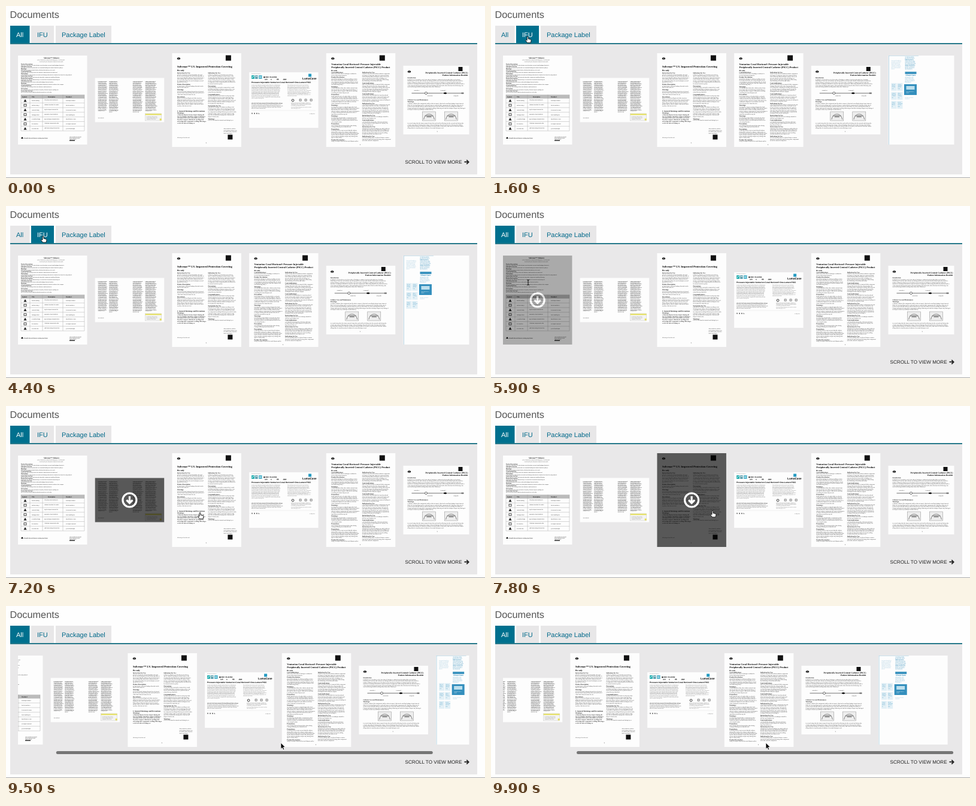
Recreate the animation shown at these times as an HTML page. Size 800 px wide and 288 px high, loop 10000 ms.

```html
<!DOCTYPE html>
<html lang="en">
<head>
<meta charset="utf-8">
<title>Documents</title>
<style>
html, body { margin: 0; width: 100%; height: 100%; overflow: hidden; background: #fefefe; }
svg { display: block; font-family: "Liberation Sans", Arial, sans-serif; text-rendering: geometricPrecision; }
.serif { font-family: "Liberation Serif", "Times New Roman", serif; }
.bold { font-weight: bold; }
.tip { font-family: Inter, "Liberation Sans", sans-serif; }
text { white-space: pre; }
</style>
</head>
<body>
<svg id="stage" width="800" height="288" viewBox="0 0 800 288"></svg>
<script>
const TEAL = '#00708e', W = 115.5, PITCH = 128.7, LOOP = 10000, STEP = 100;
const HEIGHTS = [149, 74, 157, 93, 157, 115, 149];

let seed = 7;
const rnd = () => (seed = seed * 16807 % 2147483647) / 2147483647;

const text = (x, y, s, size, cls = '', more = '') =>
  `<text x="${x}" y="${y}" font-size="${size}" class="${cls}" ${more}>${s}</text>`;
const rect = (x, y, w, h, fill, more = '') =>
  `<rect x="${x}" y="${y}" width="${w}" height="${h}" fill="${fill}" ${more}/>`;
const path = (d, more = '') => `<path d="${d}" ${more}/>`;
const range = (n, f) => Array.from({ length: n }, (_, i) => f(i)).join('');

// Running filler text
const WORDS = ('the catheter should be placed using sterile technique and secured to the skin as directed ' +
  'by a trained clinician do not alter any component during insertion or removal inspect site daily for ' +
  'redness swelling or leakage dispose of used items following local policy').split(' ');
const STREAM = Array.from({ length: 500 }, () => WORDS[rnd() * WORDS.length | 0]).join(' ');
const HEADS = ['Product Description:', 'Indications for Use:', 'Warnings:', 'Contraindications:', 'Precautions:', 'Instructions for Use:'];

function para(x, y, w, n, size, lead, cls = 'serif', fill = '#222') {
  const chars = Math.round(w / size / (cls.includes('serif') ? .425 : .5));
  return range(n, i => {
    const from = rnd() * (STREAM.length - 200) | 0;
    const len = i == n - 1 && n > 1 ? chars * (.4 + rnd() * .4) : chars;
    return text(x, y + i * lead, STREAM.substr(from, len).trim(), size, cls, `fill="${fill}"`);
  });
}

// Headed paragraphs filling a column
function column(x, y, w, bottom, size = 2.3, lead = 2.55) {
  let out = '';
  while (y < bottom) {
    const n = Math.max(1, Math.min(2 + rnd() * 6 | 0, Math.floor((bottom - y) / lead)));
    out += text(x, y, HEADS[rnd() * HEADS.length | 0], size + .2, 'serif bold') + para(x, y + lead, w, n, size, lead);
    y += (n + 1.5) * lead;
  }
  return out;
}

const badge = (x, y) => `<ellipse cx="${x}" cy="${y}" rx="2.8" ry="1.8"/>` +
  text(x - 1.4, y + .8, 'EN', 2, 'bold', 'fill="#fff"');

const pages = [
  () => text(43, 5.2, 'Solvenar™ Velmora', 3, 'serif bold') +
    para(32, 8, 52, 1, 2, 2) + para(36, 10.5, 44, 1, 2, 2) +
    range(12, i => text(5, 14.5 + i * 4.1, HEADS[i % 6], 2, 'bold') +
      para(5, 16.5 + i * 4.1, 55 + rnd() * 50, 1, 1.9, 2, '')) +
    rect(5, 65.5, 106, 6, '#bbb') +
    range(4, i => text([7, 23, 50, 80][i], 69.5, ['Symbol', 'Title', 'Description', 'Standard'][i], 2.2, 'bold')) +
    range(8, i => path(`M5 ${71.5 + i * 7.8}H111`, 'stroke="#999" stroke-width=".4"')) +
    range(5, i => path(`M${[5, 20, 41, 75, 111][i]} 65.5V126`, 'stroke="#999" stroke-width=".4"')) +
    range(7, i => {
      const y = 75.4 + i * 7.8;
      return (i % 2 ? rect(10, y - 1.7, 4, 3.4, 'none', 'stroke="#222" stroke-width=".8"')
                    : path(`M9.5 ${y + 2}L12 ${y - 2.5}L14.5 ${y + 2}Z`, 'fill="#222"')) +
        para(23, y + .7, 15, 1, 2, 2, '') + para(44, y, 28, 1, 2, 2, '') + para(80, y + .7, 18, 1, 2, 2, '');
    }) +
    path('M5 139l2-3l2 3z') + para(10, 139, 42, 1, 2.1, 2, 'bold') +
    para(86, 137, 21, 3, 2, 2.2, '') + rect(86, 141.5, 9, 1.5, '#333'),

  () => [[5, 17, 52], [23.5, 17, 54], [63, 18, 54], [84, 20, 52]].map(([x, w, h]) =>
      para(x, 6, w, h / 1.55 | 0, 1.7, 1.55, '', '#111')).join('') +
    para(5, 67, 12, 1, 1.7, 2, '') + rect(84, 59.5, 27, 12, '#f4f4f4', 'stroke="#bbb" stroke-width=".4"') +
    rect(84, 60, 27, 2, '#e5df55') + para(86, 65, 22, 3, 1.7, 2, '', '#666') + rect(108, 68, 3, 3, '#e5df55'),

  () => badge(11, 9) + rect(89.5, 3.5, 9, 9, '#111') +
    text(8.5, 23.5, 'Solvenar™ I.V. Improved Protection Covering', 4.65, 'serif bold') +
    text(8.5, 29.5, 'Rx only', 3.6, 'serif bold') +
    column(8.5, 34, 48, 89) + text(8.5, 98, '1. General Warnings and Precautions', 2.9, 'serif bold') +
    text(8.5, 101, 'Warnings:', 2.6, 'serif bold') + para(8.5, 104, 48, 6, 2.4, 2.7, 'serif bold') +
    column(60, 34, 48, 114) + para(86, 127, 22, 4, 2.1, 2.6, 'serif') +
    rect(93, 136.5, 8, 8, '#111') + para(8.5, 142, 24, 1, 2, 2) + text(56, 151, '1', 2.4),

  () => para(4, 2.5, 18, 1, 1.8, 2, '', '#777') +
    rect(4, 5, 5, 6, '#26aeb1') + rect(10, 5, 4.5, 6, '#5a9fae') + rect(16, 5, 5.5, 6, '#55b6cd') +
    path('M5 9l3-3M11 7h3M17 8h3', 'stroke="#fff" stroke-width="1"') +
    text(24, 8.5, '▣ REF VX-41552', 2.8, 'bold') +
    ['4.5', '1', '55', '.018'].map((s, i) => text(26 + i * 10, 12.8, s, 3.2, 'bold')).join('') +
    rect(99, 2.5, 5, 5, '#269bc2') + text(89, 12.1, 'LumaCase', 4.65, 'bold') +
    text(4, 18.3, 'Pressure Injectable Venturion Coral Horizon® One-Lumen PICC', 3.3, 'bold') +
    para(4, 22, 55, 13, 1.9, 1.8, '', '#666') + para(64, 22, 42, 11, 1.9, 1.8, '', '#777') +
    `<circle cx="73" cy="47" r="1.9" fill="none" stroke="#111" stroke-width=".8"/>` +
    range(3, i => rect(84 + i * 9, 45, 3, 3, 'none', 'stroke="#333" stroke-width=".6"')) +
    para(70, 52, 39, 3, 1.9, 1.8, '', '#555') + para(4, 51.5, 59, 6, 1.9, 1.9, '', '#444') +
    para(70, 59, 39, 2, 1.9, 1.8, '', '#777') + path('M4 64H111', 'stroke="#ccc" stroke-width=".3"') +
    text(4, 69.5, 'V  X  6  L', 3.2, 'bold') + para(101, 69.5, 10, 1, 1.9, 2, '', '#666'),

  () => badge(11, 9) + rect(89, 3.5, 9, 9, '#111') +
    text(8.5, 20, 'Venturion Coral Horizon® Pressure Injectable', 4.15, 'serif bold') +
    text(8.5, 25, 'Peripherally Inserted Central Catheter (PICC) Product', 4.15, 'serif bold') +
    text(8.5, 29.5, 'Rx only', 3, 'serif bold') +
    column(8.5, 33, 48, 149, 2.3, 2.4) + column(60, 33, 48, 149, 2.3, 2.4) + text(56, 154, '1', 2.4),

  () => badge(10, 10) + rect(92, 2, 7, 7, '#111') +
    text(108, 13, 'Peripherally Inserted Central Catheter (PICC)', 3.55, 'serif bold', 'text-anchor="end"') +
    text(108, 17, 'Patient Information Booklet', 3.55, 'serif bold', 'text-anchor="end"') +
    text(7, 20.5, 'Introduction:', 2.5, 'serif bold') + para(7, 23.5, 101, 6, 2.3, 2.5) +
    path('M14 46H66M74 46H99', 'stroke="#333" stroke-width=".7"') +
    `<circle cx="38" cy="46" r="2" fill="#fff" stroke="#333" stroke-width=".7"/>` +
    path('M66 46l4-1.5l4 1.5l-4 1.5z') + rect(97, 44.8, 4, 2.4, '#777') +
    range(4, i => para(18 + i * 22, i % 2 ? 51 : 42, 10, 1, 1.9, 2, '')) +
    text(7, 57.5, 'Catheter Care and Maintenance', 2.5, 'serif bold') +
    text(7, 61, 'Warnings:', 2.5, 'serif bold') + para(7, 64, 101, 5, 2.3, 2.5) +
    [32, 69].map(x => rect(x, 77, 22, 15, '#eee', 'stroke="#888" stroke-width=".5"') +
      path(`M${x + 2} 90q2-9 9-9t9 9M${x + 4} 84h14`, 'fill="none" stroke="#555" stroke-width=".7"') +
      rect(x + 7, 83, 8, 3.5, '#999')).join('') +
    para(7, 97, 101, 4, 2.3, 2.5) + text(56, 111, '1', 2.3),

  () => rect(.5, 0, .8, 149, '#a9cfe2') + rect(.5, 0, 50, .6, '#a9cfe2') +
    para(28, 3, 19, 12, 2, 1.8, '', '#2585b5') + para(5, 9, 18, 8, 2, 2, '', '#8dbdd5') +
    rect(28, 27, 19, 4, '#3d94bf') + text(29, 33.5, 'Chest Care', 3.2, 'bold', 'fill="#2585b5"') +
    para(28, 37, 19, 5, 2, 2, '', '#5ba5c8') + rect(26.5, 48, 21, 18, '#348fbd') +
    rect(30, 51, 14, 6, '#bcdfed') + para(30, 61, 14, 2, 2, 2.2, '', '#fff') +
    range(6, i => rect(5 + i % 2 * 10, 46 + (i >> 1) * 15, 9, 13, '#e3f0f6') +
      para(6 + i % 2 * 10, 49 + (i >> 1) * 15, 7, 4, 1.9, 2.2, '', '#3d94bf')) +
    para(28, 71, 18, 2, 2, 2.4, '', '#8dbdd5')
];

const icon = 'fill="none" stroke="#fff" stroke-width="3.2"';
const docs = pages.map((page, i) => {
  const h = HEIGHTS[i];
  return `<g id="doc${i}">${rect(0, 0, W, h, '#fdfdfd')}${page()}
    <g id="over${i}">${rect(0, 0, W, h, '#000', 'fill-opacity=".65"')}
    <g transform="translate(57.7 ${h / 2})"><circle r="11.5" ${icon}/>${path('M0-6.5V5M-5 0L0 5L5 0', icon)}</g></g></g>`;
}).join('');

const TABS = [['All', 7, 32.5], ['IFU', 42, 38], ['Package Label', 83, 93]];
const VIEWS = [[0, 1, 2, 3, 4, 5, 6], [0, 1, 2, 4, 5, 6], [3]];

stage.innerHTML =
  text(6.5, 20, 'Documents', 16.3, '', 'fill="#555"') +
  TABS.map(([s, x, w], i) => rect(x, 33, w, 30, '', `id="tab${i}"`) +
    text(x + 10, 51.5, s, 11, '', `id="label${i}"`)).join('') +
  rect(7, 62, 780, 2, '#26788a') + rect(7, 64, 780, 218, '#e9e8e9') +
  `<clipPath id="view">${rect(20, 64, 753.5, 190, '#000')}</clipPath><g clip-path="url(#view)">${docs}</g>` +
  rect(0, 243, 629, 5, '#767676', 'rx="2.5" id="bar"') +
  `<g id="more">${text(666.5, 264, 'SCROLL TO VIEW MORE', 8.15, '', 'fill="#222"')}
    ${path('M765.5 261.2H772M769.3 257.8L772.7 261.2L769.3 264.6', 'fill="none" stroke="#222" stroke-width="1.8"')}</g>` +
  rect(0, 287, 800, 1, '#aaa') +
  `<g id="tip">${rect(466, 211.5, 83.5, 13.5, '#59595b')}${text(470, 221.3, 'Download Document', 7.7, 'tip', 'fill="#fff"')}</g>` +
  `<g id="cursor">${path('M0 0V10.5L2.4 8.3L4 12L5.8 11.2L4.2 7.6H7.4Z', 'id="plain" stroke="#fff" stroke-width=".8"')}
    ${path('M-1 1.2Q0-.6 1 1.2V4.4L5 5.4Q6.2 5.8 5.8 7.6L5 11H-.5L-3.6 7Q-3.4 5.4-1 6.8Z', 'id="hand" fill="#fff" stroke="#111" stroke-width=".9"')}
    ${path('M-2-4.5Q0-4.5 0-3Q0-4.5 2-4.5M0-3V3M-2 4.5Q0 4.5 0 3Q0 4.5 2 4.5', 'id="beam" fill="none" stroke="#111" stroke-width="1"')}</g>`;

const $ = id => document.getElementById(id);
const show = (id, on) => $(id).setAttribute('visibility', on ? 'visible' : 'hidden');
const clamp = v => Math.max(0, Math.min(1, v));

// Pointer stops: time, x, y
const MOVES = [[400, 5, 72], [700, 22, 76], [900, 24, 74], [1300, 60, 50], [1800, 62, 51], [2000, 62, 51],
  [2600, 116, 54], [3400, 116, 54], [4000, 62, 50], [4500, 62, 50], [4800, 24, 48], [5400, 24, 48],
  [5900, 62, 128], [6300, 75, 150], [6600, 75, 150], [7000, 245, 165], [7200, 324, 178],
  [7600, 334, 168], [7800, 370, 175], [8100, 460, 196], [8200, 460, 198], [8500, 459, 229]];
const HOVERS = [[5700, 6700], [6700, 7200], [7200, 7850], [7850, 8150]];

function pointer(t) {
  const i = MOVES.findIndex(m => m[0] > t);
  if (i < 0) return MOVES.at(-1).slice(1);
  if (!i) return MOVES[0].slice(1);
  const [a, x, y] = MOVES[i - 1], [b, u, v] = MOVES[i], k = (t - a) / (b - a);
  return [x + (u - x) * k, y + (v - y) * k];
}

function render(t) {
  const tab = t < 1300 || t >= 5000 ? 0 : t < 2900 || t >= 4000 ? 1 : 2;
  TABS.forEach((_, i) => {
    $('tab' + i).setAttribute('fill', i == tab ? TEAL : '#e8e7e8');
    $('label' + i).setAttribute('fill', i == tab ? '#fff' : '#00698a');
  });

  const scroll = 74 * clamp((t - 9100) / 400) + 71 * clamp((t - 9500) / 400);
  const view = VIEWS[tab], tall = Math.max(...view.map(i => HEIGHTS[i]));
  HEIGHTS.forEach((h, i) => {
    const k = view.indexOf(i);
    $('doc' + i).style.display = k < 0 ? 'none' : '';
    $('doc' + i).setAttribute('transform', `translate(${20 + k * PITCH - scroll} ${79 + (tall - h) / 2})`);
    const [a, b] = HOVERS[i] || [LOOP, LOOP];
    $('over' + i).setAttribute('opacity', Math.min(clamp((t - a) / 400), clamp(1 - (t - b) / 400)));
  });
  $('bar').setAttribute('x', 22 + scroll * .835);
  show('bar', t >= 9100);
  show('more', tab == 0);
  show('tip', t >= 8300 && t < 8800);

  const [x, y] = pointer(t);
  const beam = t >= 5800 && t < 6000;
  const overTab = y > 33 && y < 62 && TABS.some(([, l, w]) => x >= l && x <= l + w);
  const hand = !beam && (overTab || HOVERS.some(([a, b]) => t >= a && t < b));
  $('cursor').setAttribute('transform', `translate(${x} ${y})`);
  const on = t >= 400;
  show('beam', on && beam);
  show('hand', on && hand);
  show('plain', on && !beam && !hand);
}

function tick() {
  render(Math.floor(performance.now() % LOOP / STEP) * STEP);
  requestAnimationFrame(tick);
}
tick();
</script>
</body>
</html>
```
